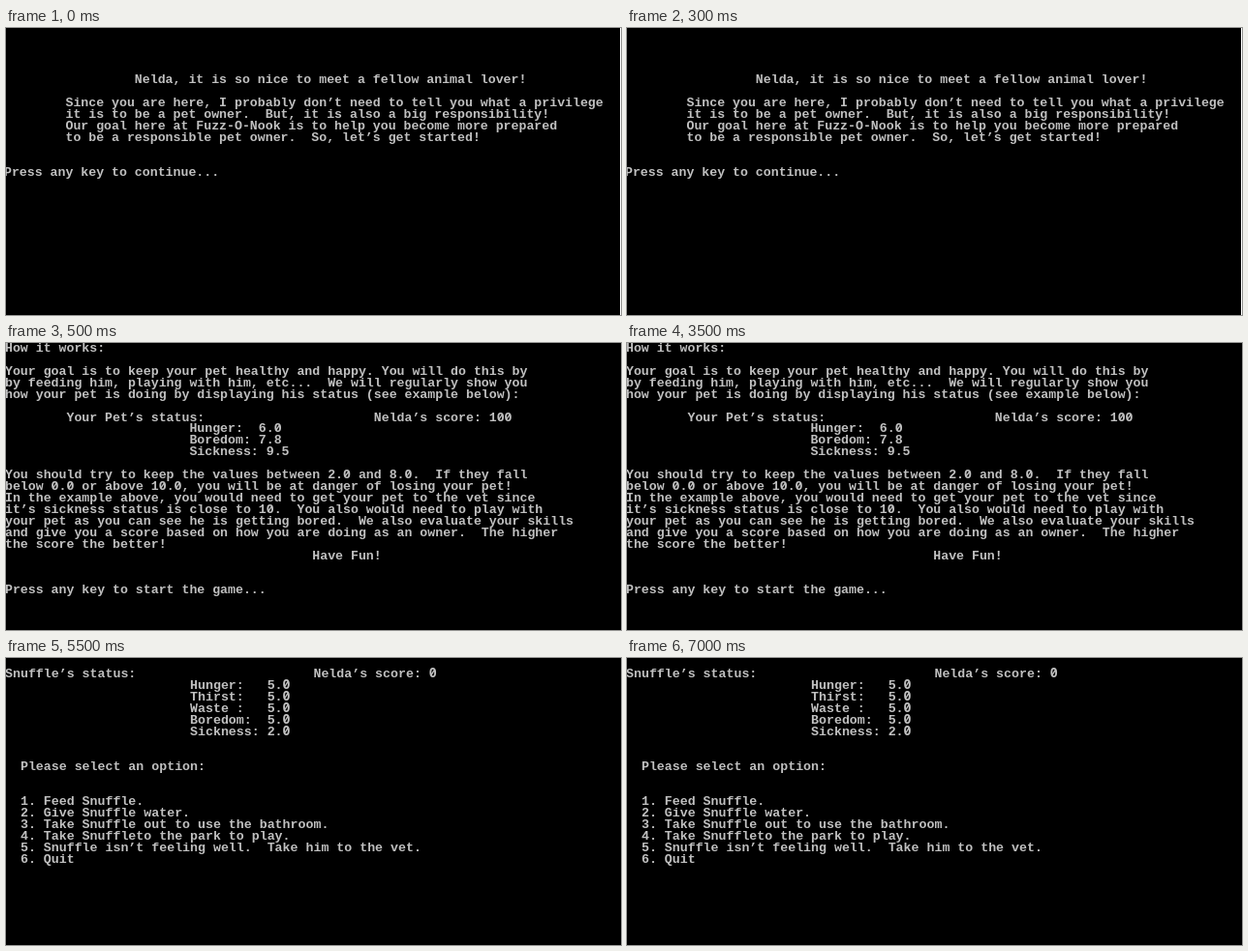
Animation, 635 px wide and 297 px high, one loop 8 s. Source, as an HTML page:

```html
<!DOCTYPE html>
<html lang="en">
<head>
<meta charset="utf-8">
<title>Pet game console</title>
<style>
html, body { margin: 0; width: 100%; height: 100%; overflow: hidden; background: #000; }
.stage { position: relative; width: 635px; height: 297px; overflow: hidden; }
.screen {
  position: absolute; inset: 0; overflow: hidden; visibility: hidden;
  background: #000; color: #c0c0c0;
  animation: 8s step-end infinite;
}
pre {
  position: absolute; left: var(--x); top: var(--y); margin: 0;
  /* 80 columns across the 635px stage */
  font: bold 13.227px/12px "Liberation Mono", monospace;
}
/* slashed zero */
b { font-family: "Noto Sans Mono", monospace; line-height: 0; }
.welcome { --x: -2px; --y: 0px; animation-name: welcome; border-right: 1px solid #fff; }
.rules { --x: -1px; --y: 0px; animation-name: rules; }
.rules pre { line-height: 11.92px; }
.menu { --x: -1px; --y: -1px; animation-name: menu; }
.menu pre { font-size: 13.27px; }
@keyframes welcome { 0% { visibility: visible } 6.25%, 100% { visibility: hidden } }
@keyframes rules { 0% { visibility: hidden } 6.25% { visibility: visible } 68.75%, 100% { visibility: hidden } }
@keyframes menu { 0% { visibility: hidden } 68.75%, 100% { visibility: visible } }
</style>
</head>
<body>
<div class="stage">
<div class="screen welcome"><pre>
&#8203;



                 Nelda, it is so nice to meet a fellow animal lover!

        Since you are here, I probably don’t need to tell you what a privilege
        it is to be a pet owner.  But, it is also a big responsibility!
        Our goal here at Fuzz-O-Nook is to help you become more prepared
        to be a responsible pet owner.  So, let’s get started!


Press any key to continue...
</pre></div>
<div class="screen rules"><pre>
How it works:

Your goal is to keep your pet healthy and happy. You will do this by
by feeding him, playing with him, etc...  We will regularly show you
how your pet is doing by displaying his status (see example below):

        Your Pet’s status:                      Nelda’s score: 1<b>00</b>
                        Hunger:  6.<b>0</b>
                        Boredom: 7.8
                        Sickness: 9.5

You should try to keep the values between 2.<b>0</b> and 8.<b>0</b>.  If they fall
below <b>0</b>.<b>0</b> or above 1<b>0</b>.<b>0</b>, you will be at danger of losing your pet!
In the example above, you would need to get your pet to the vet since
it’s sickness status is close to 1<b>0</b>.  You also would need to play with
your pet as you can see he is getting bored.  We also evaluate your skills
and give you a score based on how you are doing as an owner.  The higher
the score the better!
                                        Have Fun!


Press any key to start the game...
</pre></div>
<div class="screen menu"><pre>
&#8203;
Snuffle’s status:                       Nelda’s score: <b>0</b>
                        Hunger:   5.<b>0</b>
                        Thirst:   5.<b>0</b>
                        Waste :   5.<b>0</b>
                        Boredom:  5.<b>0</b>
                        Sickness: 2.<b>0</b>


  Please select an option:


  1. Feed Snuffle.
  2. Give Snuffle water.
  3. Take Snuffle out to use the bathroom.
  4. Take Snuffleto the park to play.
  5. Snuffle isn’t feeling well.  Take him to the vet.
  6. Quit
</pre></div>
</div>
</body>
</html>
```
